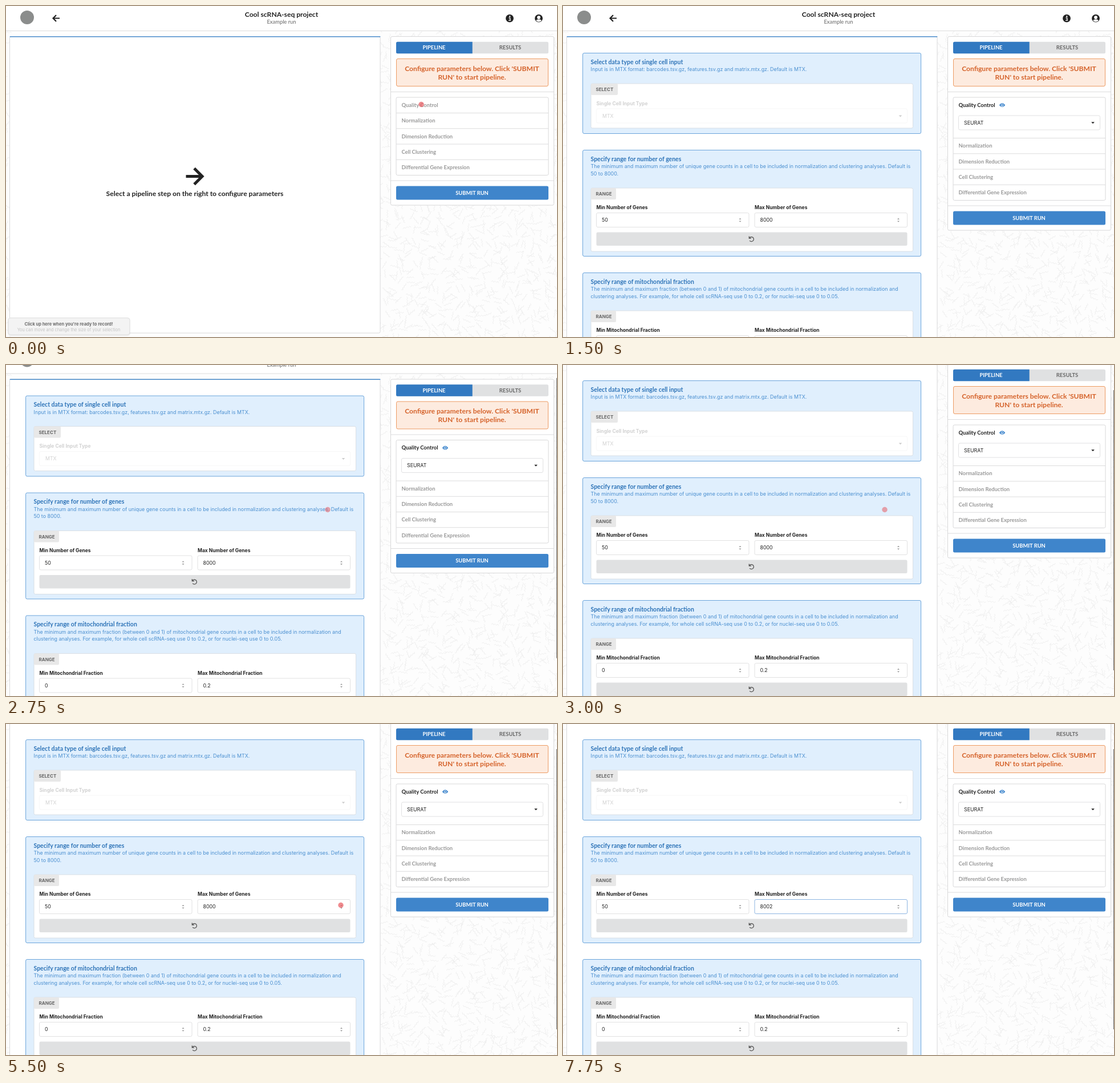
These frames come from a looping animation (966 px wide and 580 px high, 8 s). An HTML page:

```html
<!DOCTYPE html>
<html lang="en">
<head>
<meta charset="utf-8">
<title>Pipeline run</title>
<style>
html, body { margin: 0; width: 100%; height: 100%; overflow: hidden; background: #fff; }
svg { display: block; width: 966px; height: 580px; }
text { font: 400 8.89px Inter, "Open Sans", sans-serif; fill: #222; white-space: pre; }
.lato { font: 700 9.39px Lato, sans-serif; }
.big { font-size: 12.1px; }
.sub { font-weight: 400; fill: #666; }
.mid { text-anchor: middle; }
.off { fill: #999; }
.dim { fill: #666; }
.white { fill: #fff; }
.warn { fill: #d5622a; }
.head { font-size: 10.5px; fill: #2e74b8; }
.info { fill: #4a8fd0; }
.tag { font-weight: 700; font-size: 8px; fill: #666; }
.label { font-weight: 700; font-size: 8.5px; }
.value { font-size: 8.8px; }
.faint { fill: #d2d2d2; }
.tip { font-weight: 700; font-size: 7.5px; fill: #6c6c6c; }
.hint { font-size: 7.33px; fill: #c3c3c3; }
.line { fill: none; stroke: #dcdcdd; }
.card { fill: #fff; stroke: #d8d8d9; }
.field { fill: #fff; stroke: #e1e1e2; }
.note { fill: #e0effd; stroke: #4a90d2; stroke-width: .8; }
.alert { fill: #fdebdf; stroke: #e8843f; stroke-width: .8; }
</style>
</head>
<body>
<svg id="stage" viewBox="0 0 966 580"></svg>
<script>
const LOOP = 8000, STEP = 250;
const stage = document.getElementById('stage');

const text = (x, y, s, cls = '', id = '') =>
  `<text x="${x}" y="${y}" class="${cls}"${id && ` id="${id}"`}>${s}</text>`;
const rect = (x, y, w, h, attrs = '', r = 2.5) =>
  `<rect x="${x}" y="${y}" width="${w}" height="${h}" rx="${r}" ${attrs}/>`;
const hline = (x1, x2, y) => `<path class="line" d="M${x1} ${y}H${x2}"/>`;
const caret = (x, y, fill) => `<path d="M${x - 2.8} ${y - 1.3}h5.6l-2.8 3z" fill="${fill}"/>`;

function random(seed) {
  return () => (seed = (seed * 16807) % 2147483647) / 2147483647;
}

// Wallpaper of short wiggly strokes
function wiggles() {
  const rnd = random(77);
  let d = '';
  const strip = (from, to) => {
    for (let y = 46; y < 650; y += 11) {
      for (let x = from; x < to; x += 14) {
        const a = rnd() * Math.PI * 2;
        d += `M${(x + rnd() * 9).toFixed(1)} ${(y + rnd() * 9).toFixed(1)}`;
        for (let i = 0; i < 6; i++) {
          const b = a + (i % 2 ? 0.65 : -0.65) + (rnd() - 0.5) * 0.4;
          d += `l${(Math.cos(b) * 3).toFixed(1)} ${(Math.sin(b) * 3).toFixed(1)}`;
        }
      }
    }
  };
  strip(-6, 7);
  strip(652, 966);
  return `<path d="${d}" fill="none" stroke="#ebebeb" stroke-width=".8" stroke-linejoin="round"/>`;
}

function header() {
  return rect(0, 0, 966, 43, 'fill="#fff"', 0) + hline(0, 966, 43.5) +
    '<circle cx="37" cy="20" r="12" fill="#8b8d8c"/>' +
    '<path d="M94 21.5H82.6M88 16l-5.5 5.5L88 27" fill="none" stroke="#222" stroke-width="2.2"/>' +
    text(483, 18.7, 'Cool scRNA-seq project', 'lato big mid') +
    text(483, 31, 'Example run', 'lato sub mid') +
    '<circle cx="883" cy="21.7" r="6.9" fill="#222"/>' +
    '<path d="M881.3 20.8h2.5v4.2M881 25.2h4.2" fill="none" stroke="#fff" stroke-width="1.3"/>' +
    '<circle cx="883.2" cy="18.2" r="1.2" fill="#fff"/>' +
    '<circle cx="934" cy="21.7" r="6.9" fill="#222"/><circle cx="934" cy="20" r="2.9" fill="#fff"/>' +
    '<path d="M929.3 25.6q1-2.1 3-2.1h3.4q2 0 3 2.1a6 6 0 0 1-9.4 0z" fill="#fff"/>';
}

function sidebar() {
  const steps = ['Normalization', 'Dimension Reduction', 'Cell Clustering', 'Differential Gene Expression'];
  return '<rect id="card" class="card" x="674.5" y="53.5" width="286" height="295.5" rx="2.5"/>' +
    rect(684, 62.8, 267, 20.4, 'fill="#e0e1e2"') +
    '<path d="M686.5 62.8H817.7V83.2H686.5a2.5 2.5 0 0 1-2.5-2.5V65.3a2.5 2.5 0 0 1 2.5-2.5z" fill="#3279c1"/>' +
    text(750.5, 76.4, 'PIPELINE', 'lato mid white') +
    text(884, 76.4, 'RESULTS', 'lato mid dim') +
    rect(684.5, 92.5, 266, 48, 'class="alert"') +
    text(817, 113.5, "Configure parameters below. Click 'SUBMIT", 'lato big mid warn') +
    text(817, 128.6, "RUN' to start pipeline.", 'lato big mid warn') +
    hline(675, 960, 150.5) +
    '<rect id="steps" class="card" x="684" y="160" width="267" height="136.5" rx="2.5"/>' +
    text(693.5, 176.8, 'Quality Control', 'lato', 'qc') +
    '<g id="choice"><path d="M764.8 173.7q5.2-6.8 10.4 0q-5.2 6.8-10.4 0z" fill="#3a83cb"/>' +
    '<circle cx="770" cy="173.7" r="2.3" fill="#fff"/><circle cx="770" cy="173.7" r="1.4" fill="#3a83cb"/>' +
    rect(693.5, 192, 248, 25, 'class="field"') +
    text(703, 207.5, 'SEURAT', 'value') + caret(929, 204.5, '#222') + '</g>' +
    '<g id="lower">' + steps.map((s, i) =>
      hline(684, 951, 187.5 + i * 27.25) + text(693.5, 204.3 + i * 27.25, s, 'lato off')).join('') +
    hline(675, 960, 306) + rect(684, 315.6, 267, 23.9, 'fill="#3f85cb"') +
    text(817, 330.9, 'SUBMIT RUN', 'lato mid white') + '</g>';
}

function message(y, h, title, lines) {
  return rect(34.6, y, 593, h, 'class="note"') +
    text(48.5, y + 19.4, title, 'lato head') +
    lines.map((s, i) => text(48.5, y + 31.7 + i * 12.7, s, 'info')).join('');
}

const segment = (y, h, tag) => rect(49, y, 564.5, h, 'fill="#fff" stroke="#d9dfe5"') +
  rect(49, y, tag === 'RANGE' ? 44 : 47, 20, 'fill="#e8e8e8"', 2) +
  text(57.5, y + 13, tag, 'tag');

function numberField(x, y, name, value, id = '') {
  const s = x + 252;
  return text(x, y - 6.3, name, 'label') +
    rect(x, y, 267.5, 25, `class="field"${id && ` id="${id}Box"`}`) +
    text(x + 9.5, y + 15.8, value, 'value', id) +
    `<path d="M${s - 2} ${y + 11.6}l2-2.4 2 2.4zM${s - 2} ${y + 13.9}l2 2.4 2-2.4z" fill="#999"/>`;
}

function rangeBlock(y, title, lines, noun, min, max, id) {
  return message(y, 186, title, lines) + segment(y + 66.5, 111, 'RANGE') +
    numberField(58.5, y + 110, 'Min ' + noun, min) +
    numberField(336, y + 110, 'Max ' + noun, max, id) +
    rect(58.5, y + 144, 545, 23.5, 'fill="#e0e1e2"') +
    `<path d="M326.8 ${y + 154.3}a4 4 0 1 1 .4 4.3M326.3 ${y + 151}v3.7h3.7" fill="none" stroke="#555" stroke-width="1.3"/>`;
}

function form() {
  return '<g id="form">' +
    message(82.5, 141, 'Select data type of single cell input',
      ['Input is in MTX format: barcodes.tsv.gz, features.tsv.gz and matrix.mtx.gz. Default is MTX.']) +
    segment(136, 78, 'SELECT') +
    text(58.5, 173.6, 'Single Cell Input Type', 'label faint') +
    rect(58.5, 180, 545, 25, 'fill="none" stroke="#f7f7f7"') +
    text(69, 195.6, 'MTX', 'value faint') + caret(591.5, 192.7, '#ccc') +
    rangeBlock(252.5, 'Specify range for number of genes', [
      'The minimum and maximum number of unique gene counts in a cell to be included in normalization and clustering analyses. Default is',
      '50 to 8000.'], 'Number of Genes', '50', '8000', 'genes') +
    rangeBlock(467.5, 'Specify range of mitochondrial fraction', [
      'The minimum and maximum fraction (between 0 and 1) of mitochondrial gene counts in a cell to be included in normalization and',
      'clustering analyses. For example, for whole cell scRNA-seq use 0 to 0.2, or for nuclei-seq use 0 to 0.05.'],
      'Mitochondrial Fraction', '0', '0.2', 'fraction') + '</g>';
}

const prompt = '<g id="prompt">' +
  '<path d="M315.5 298.5H344M330 284.5l14 14-14 14" fill="none" stroke="#222" stroke-width="5"/>' +
  text(331, 333, 'Select a pipeline step on the right to configure parameters', 'lato big mid') + '</g>';

const tip = '<g id="tip">' +
  rect(3, 546.5, 215, 32, 'fill="#000" opacity=".05"', 5) +
  rect(4, 546.5, 213, 29.5, 'fill="#f3f3f3" stroke="#dedede"', 4) +
  text(110, 559.7, "Click up here when you're ready to record!", 'mid tip') +
  text(110, 569.5, 'You can move and change the size of your selection', 'mid hint') + '</g>';

stage.innerHTML = rect(0, 0, 966, 580, 'fill="#fdfdfd"', 0) +
  '<g id="page">' + wiggles() + header() +
  '<rect id="panel" class="card" x="6.5" y="53.5" width="649.5" height="519.5" rx="2.5"/>' +
  rect(6.5, 52.9, 650, 1.5, 'fill="#4a8ccb"', 0.7) +
  prompt + form() + sidebar() + '</g>' + tip +
  '<rect id="thumb" x="965" width="1" height="491" fill="#6a6a6a"/>' +
  '<circle id="cursor" r="4.7"/>';

const el = {};
stage.querySelectorAll('[id]').forEach(n => el[n.id] = n);
const set = (n, attrs) => { for (const k in attrs) n.setAttribute(k, attrs[k]); };
const show = (n, on) => n.setAttribute('visibility', on ? 'visible' : 'hidden');

// time, x, y
const path = [
  [0, 728, 172.5], [1500, 728, 172.5], [2250, 564, 253.5], [3000, 564, 253.5],
  [3750, 609, 331], [4500, 587, 317.5], [8000, 587, 317.5]
];

function pointAt(t) {
  const i = path.findIndex(p => t < p[0]);
  const [a, b] = [path[i - 1], path[i]];
  const k = (t - a[0]) / (b[0] - a[0]);
  const e = k * k * (3 - 2 * k);
  return [a[1] + (b[1] - a[1]) * e, a[2] + (b[2] - a[2]) * e];
}

function draw(ms) {
  const t = Math.floor((ms % LOOP) / STEP) * STEP;
  const open = t >= 1500, shift = open ? 44 : 0;
  const scroll = t < 2750 ? 0 : t < 3000 ? 28.5 : 55;

  set(el.page, { transform: `translate(0 ${-scroll})` });
  set(el.thumb, { y: scroll * 0.8 });
  show(el.thumb, scroll > 0);

  show(el.prompt, !open);
  show(el.form, open);
  show(el.choice, open);
  set(el.panel, { height: open ? 700 : 519.5 });
  set(el.card, { height: 295.5 + shift });
  set(el.steps, { height: 136.5 + shift });
  set(el.lower, { transform: `translate(0 ${shift})` });
  set(el.qc, { class: t < 250 ? 'lato off' : 'lato' });
  set(el.tip, { opacity: Math.max(0, 1 - t / 750) });

  el.genes.textContent = t < 5750 ? '8000' : t < 6500 ? '8001' : '8002';
  el.genesBox.style.stroke = t < 5750 ? '' : '#8db5e2';

  const [x, y] = pointAt(t);
  const pressed = t < 1250 || t >= 5500;
  set(el.cursor, { cx: x, cy: y, fill: pressed ? '#e85a60' : '#e6656d', opacity: pressed ? 0.7 : 0.58 });
  show(el.cursor, !(t >= 1250 && t < 1750) && t < 7250);
}

function tick() {
  draw(performance.now());
  requestAnimationFrame(tick);
}
tick();
</script>
</body>
</html>
```
